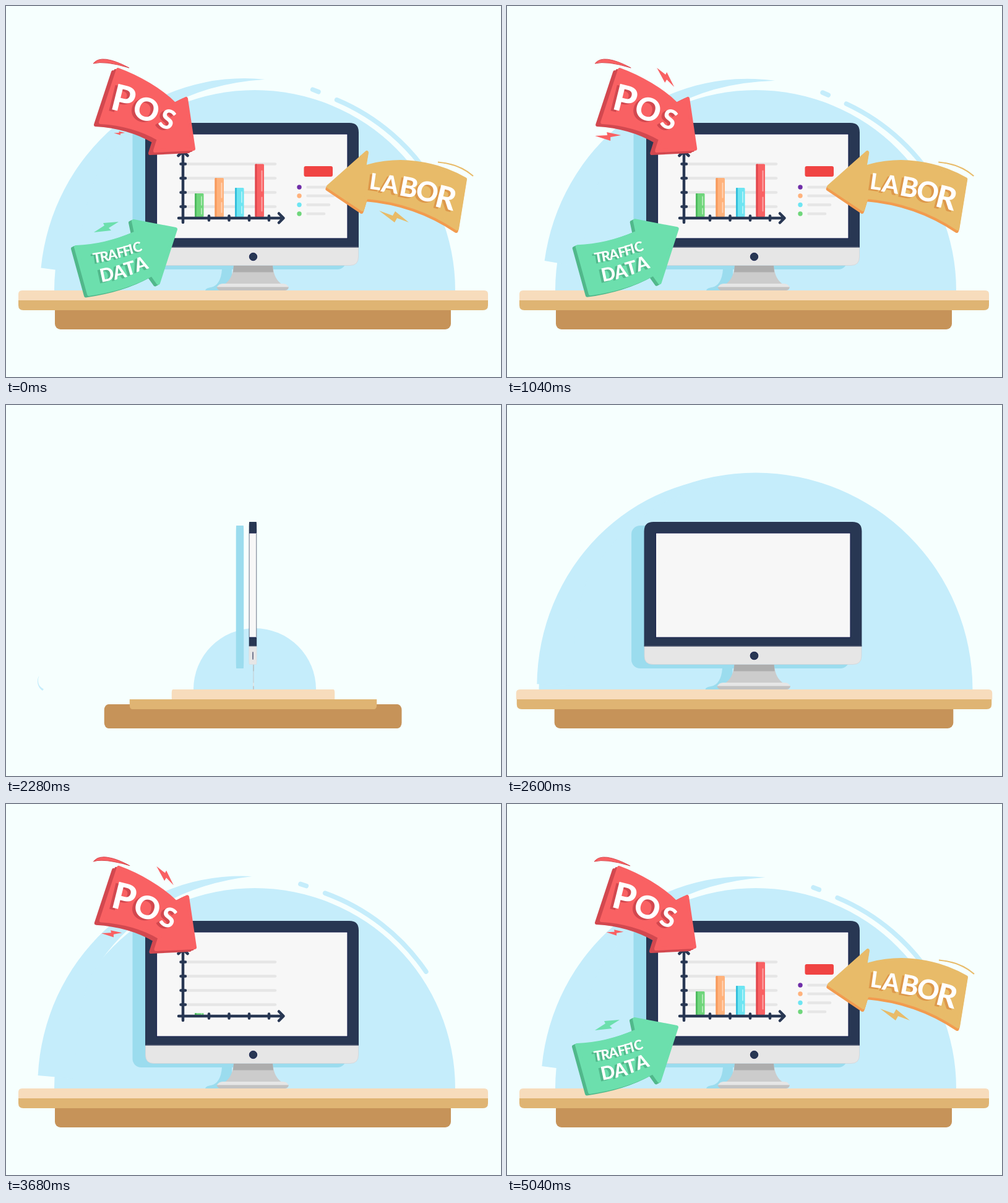
These frames come from a looping animation (800x600 px, 5080 ms). An HTML page:

```html
<!DOCTYPE html>
<html lang="en">
<head>
<meta charset="utf-8">
<title>Data dashboard</title>
<style>
  html, body { margin: 0; width: 100%; height: 100%; overflow: hidden; background: #f6fffe; }
  svg { display: block; width: 100%; height: 100%; }
  text { font-family: Lato, "Open Sans", sans-serif; font-weight: 800; text-anchor: middle; }
  .axis { fill: none; stroke: #283753; stroke-width: 4.5; stroke-linecap: round; stroke-linejoin: round; }
  .line { fill: none; stroke: #e6e6e6; stroke-width: 4.5; stroke-linecap: round; }
  .sky { fill: none; stroke: #c5edfb; stroke-width: 7.5; stroke-linecap: round; }
</style>
</head>
<body>
<svg viewBox="0 0 800 600">
  <defs>
    <filter id="smear" filterUnits="userSpaceOnUse" x="0" y="-100" width="800" height="800">
      <feGaussianBlur id="blur" stdDeviation="0 0"/>
    </filter>
  </defs>
  <g id="scene"><g id="smeared">
    <path id="dome" d="M78 460A324 324 0 0 1 726 460Z" fill="#c5edfb"/>
    <g id="swirl">
      <path id="crescent" fill="#c5edfb" d="M50 445A328.5 339.5 0 0 1 390 116.5Q215 140 134 280Q108 340 110 449Z"/>
      <path id="dashA" class="sky" pathLength="1" d="M468.5 127.5L478 130.5"/>
      <path id="dashB" class="sky" pathLength="1" d="M508.5 141.5A336 336 0 0 1 674 265.5"/>
    </g>
    <ellipse id="glint" cx="636.5" cy="267.5" rx="3.6" ry="2.4" fill="#f6fffe"/>

    <rect id="shade" x="204.5" y="195" width="345" height="231" rx="14" fill="#9bdcee"/>
    <g id="base"><rect x="79" y="484" width="640" height="39" rx="9" fill="#c69359"/></g>
    <g id="mid"><path d="M20 476H779V484Q779 492 771 492H28Q20 492 20 484Z" fill="#dfb473"/></g>
    <g id="top"><path d="M20 476V466Q20 460 26 460H773Q779 460 779 466V476Z" fill="#f7dcbc"/></g>

    <g id="stand">
      <path d="M349 426Q347 452 331 455Q323 456 322 460H365V426Z" fill="#9bdcee"/>
      <path d="M368 420H431Q433 442 446 450H353Q366 442 368 420Z" fill="#ccc"/>
      <path d="M368 420H431L432 430.500H367Z" fill="#adadad"/>
      <path d="M340.500 455Q344 449 350 449H448Q454 449 457 455Z" fill="#e6e6e6"/>
      <path d="M340.500 454.500H457Q456 460 450 460H347Q342 460 340.500 454.500Z" fill="#c2c2c2"/>
    </g>
    <g id="monitor">
      <path d="M225 390V204Q225 189 240 189H555Q570 189 570 204V390Z" fill="#283753"/>
      <path d="M225.500 390H569.500V406Q569.500 419.500 556 419.500H239Q225.500 419.500 225.500 406Z" fill="#e6e6e6" stroke="#d3d5d9" stroke-width=".8"/>
      <path d="M225 390H570" stroke="#1c2848"/>
      <rect x="243.500" y="207" width="308.500" height="169" fill="#f7f7f7" stroke="#1b2450" stroke-width="1.2"/>
      <circle cx="399.500" cy="405.500" r="6.2" fill="#283753" stroke="#1b2450"/>
    </g>
    <g id="grid"></g>
    <g id="bars"></g>
    <g id="axes" class="axis">
      <path id="axisY" d="M286 350V236M278.500 242L286 235L293.500 242M282.500 255.500H290M282.500 278.500H290M282.500 301.500H290M282.500 324.500H290"/>
      <path id="axisX" d="M279 343H447M441 335.500L448.500 343L441 350.500M328 339.500V346.500M360.500 339.500V346.500M393 339.500V346.500M425 339.500V346.500"/>
    </g>
    <g id="legend"></g>
    <g id="pos"></g>
    <g id="labor"></g>
    <g id="traffic"></g>
  </g></g>
</svg>
<script>
const LOOP = 5080, FALL = 1440, GONE = 1720, ENTER = 2040;
const $ = id => document.getElementById(id);
const clamp = x => Math.max(0, Math.min(1, x));
const ramp = (u, start, len) => clamp((u - start) / len);
const smooth = x => x * x * (3 - 2 * x);
const swing = x => (1 - Math.cos(Math.PI * clamp(x))) / 2;

// Eased growth to 1 with a small overshoot that settles.
function rise(u, start, len = 360, over = 0.017) {
  const age = u - start;
  if (age <= 0) return 0;
  return age < len
    ? (1 + over) * swing(age / len)
    : 1 + over * (1 - swing((age - len) / len));
}

function scaleAt(el, x, y, sx, sy = sx, turn = 0) {
  el.style.display = sx > 0.0001 && sy > 0.0001 ? "" : "none";
  el.setAttribute("transform",
    `translate(${x} ${y}) rotate(${turn}) scale(${sx} ${sy}) translate(${-x} ${-y})`);
}

function draw(el, p) {
  el.style.display = p > 0 ? "" : "none";
  el.setAttribute("stroke-dasharray", p < 1 ? `${p} 2` : "none");
}

// Arrow bodies and lettering
function block(d, face, side, dx, dy) {
  const copy = (k, c) => `<path d="${d}" transform="translate(${dx * k} ${dy * k})" fill="${c}"
    stroke="${c}" stroke-width="6" stroke-linejoin="round"/>`;
  return copy(1, side) + copy(0.5, side) + copy(0, face);
}

function word(letters, shade, dx, dy) {
  const layer = (c, ox, oy) => letters.map(([ch, x, y, turn, size]) =>
    `<text transform="translate(${x + ox} ${y + oy}) rotate(${turn})" y="${size * 0.36}"
      font-size="${size}" fill="${c}">${ch}</text>`).join("");
  return layer(shade, dx, dy) + layer("#fff", 0, 0);
}

const bolt = (id, points, color) => `<polygon id="${id}" points="${points}" fill="${color}"/>`;

$("pos").innerHTML =
  `<path d="M141 93Q154 76 199 100Q160 88 141 93Z" fill="#f96163" stroke="#d9494f" stroke-width="1"/>` +
  bolt("boltA", "241,100 255,111 257,107 269,131 257,119 254,124", "#f96163") +
  bolt("boltB", "141,210 161,209 160,204 183,209 166,212 166,218", "#f96163") +
  block("M181 103C214 115 250 136 273 159L291 150L303 231L241 234L247 215C218 198 186 190 153 188Z",
    "#f96163", "#d2484f", -8, 4) +
  word([["P", 190, 150, 14, 59], ["O", 227, 167, 18, 51], ["S", 261, 183, 21, 44]], "#d2484f", -5, 2);

$("labor").innerHTML =
  `<path id="swoosh" d="M755 275Q732 255 698 252.500" pathLength="1" fill="none" stroke="#e8bb69" stroke-width="2.2"/>` +
  bolt("boltC", "603,331 625,339 629,332 651,350 632,343 628,350", "#e8bb69") +
  block("M521 292L583 237L579 261C634 244 692 252 742 280L729 360C680 327 630 313 582 309L576 329Z",
    "#e8bb69", "#f29b4f", -1.5, 4) +
  word([["L", 597, 284, 8, 36], ["A", 621, 288, 9, 39], ["B", 651, 293, 11, 44],
    ["O", 681, 300, 12, 44], ["R", 711, 310, 14, 50]], "#dd984b", -4, 2);

$("traffic").innerHTML =
  bolt("boltD", "142,366 159,355 157,351 182,349 166,359 170,363", "#6cdfad") +
  block("M113 390C147 389 180 380 210 367L206 348L274 361L246 448L236 434C206 451 170 461 134 466Z",
    "#6cdfad", "#51b88b", -5, 2.5) +
  word([["T", 147, 407, -9, 22], ["R", 159, 405, -10, 22], ["A", 172, 402, -12, 22], ["F", 185, 398.500, -13, 22],
    ["F", 195, 395.500, -14, 22], ["I", 202, 393, -15, 22], ["C", 212, 390, -16, 22]], "#51b88b", -3, 2) +
  word([["D", 163, 434, -12, 30], ["A", 183, 430, -14, 30], ["T", 200, 424, -16, 30], ["A", 218, 417, -18, 30]],
    "#51b88b", -4, 2);

// Chart and legend
$("grid").innerHTML = [255.5, 278.5, 301.5, 324.5]
  .map(y => `<path class="line" d="M288 ${y}H435"/>`).join("");

const bars = [
  [305, 303, "#6fd67b", "#4fbb60"], [337.5, 278, "#ffb27c", "#f79a5c"],
  [370, 294, "#6de5f2", "#35bfdc"], [402.5, 255.5, "#f96163", "#df474d"]
];
$("bars").innerHTML = bars.map(([x, y, face, side]) => {
  const h = 341 - y;
  return `<g><rect x="${x}" y="${y}" width="14.5" height="${h}" rx="1.5" fill="${face}"/>
    <rect x="${x}" y="${y}" width="3" height="${h}" rx="1" fill="${side}"/>
    <rect x="${x + 10}" y="${y + h * 0.12}" width="2" height="${h * 0.4}" rx="1" fill="#fff" opacity=".45"/>
    <rect x="${x + 10}" y="${y + h * 0.62}" width="2" height="${h * 0.28}" rx="1" fill="#fff" opacity=".45"/></g>`;
}).join("");

const items = [[293, 531, "#6f2da8"], [307, 529, "#ffb27c"], [321.5, 522, "#6de5f2"], [336, 514, "#6fd67b"]];
$("legend").innerHTML = `<rect x="481.500" y="259" width="46.500" height="17" rx="3" fill="#f04443"/>` +
  items.map(([y, end, color]) => `<circle cx="474" cy="${y}" r="3.7" fill="${color}"/>
    <path class="line" pathLength="1" d="M487.500 ${y}H${end}"/>`).join("");

const barEls = [...$("bars").children];
const [button, ...legendEls] = $("legend").children;

// Each span is [on, off] on the running clock.
const pulse = (u, spans) => Math.max(...spans.map(([on, off]) =>
  Math.min(smooth(ramp(u, on, 200)), 1 - ramp(u, off - 167, 167))));

function placeArrow(id, x, y, size, dx, dy) {
  const el = $(id);
  scaleAt(el, x, y, size);
  el.setAttribute("transform", `translate(${dx} ${dy}) ` + el.getAttribute("transform"));
}

function render(t) {
  const hidden = t >= GONE && t < ENTER;
  $("scene").style.display = hidden ? "none" : "";
  if (hidden) return;

  // The clock runs on from the entrance through the end of the fall.
  const u = t < GONE ? t + LOOP : t;

  const k = t < GONE ? Math.max(0, t - FALL) / 240 : 0;
  $("scene").setAttribute("transform", `translate(0 ${445 * k ** 3.2})`);
  if (k > 0) {
    $("smeared").setAttribute("filter", "url(#smear)");
    $("blur").setAttribute("stdDeviation", `0 ${8.5 * k * k}`);
  } else $("smeared").removeAttribute("filter");

  // Table, dome, monitor
  scaleAt($("base"), 399.5, 500, rise(u, 2044), 1);
  scaleAt($("mid"), 399.5, 484, rise(u, 2097), 1);
  scaleAt($("top"), 399.5, 468, rise(u, 2138), 1);
  const dip = 0.007 * smooth(ramp(u, 2600, 300)) * (1 - smooth(ramp(u, 3140, 500)));
  scaleAt($("dome"), 402, 460, rise(u, 2146, 380, 0.09) - dip);
  const wide = rise(u, 2240, 340, 0.02);
  scaleAt($("monitor"), 399, 400, wide, 1);
  scaleAt($("shade"), 378, 400, wide, 1);
  scaleAt($("stand"), 400, 440, rise(u, 2256, 340, 0.02), 1);

  // Swirl
  $("swirl").setAttribute("transform", `rotate(${2.03 * (u - 3160) / 1000} 370 530)`);
  const unfurl = rise(u, 2228, 360, 0);
  scaleAt($("crescent"), 62, 452, unfurl, unfurl, -60 * (1 - unfurl));
  draw($("dashA"), smooth(ramp(u, 2620, 160)));
  draw($("dashB"), smooth(ramp(u, 2680, 380)));
  $("glint").style.display = u > 3110 && u < 3210 ? "" : "none";

  // Chart
  scaleAt($("axisY"), 286, 343, 1, rise(u, 2720, 340, 0.03));
  scaleAt($("axisX"), 286, 343, rise(u, 2800, 340, 0.015), 1);
  scaleAt($("grid"), 361.5, 290, rise(u, 3020, 300, 0.01), 1);
  barEls.forEach((el, i) => scaleAt(el, 0, 341, 1, rise(u, 3618 + 120 * i)));
  scaleAt(button, 504.75, 267.5, rise(u, 4300, 280, 0.05));
  items.forEach(([y], i) => {
    scaleAt(legendEls[2 * i], 474, y, rise(u, 4380 + 60 * i, 240, 0.08));
    draw(legendEls[2 * i + 1], swing(ramp(u, 4420 + 60 * i, 240)));
  });

  // Arrows
  const sway = (1 - Math.cos(2 * Math.PI * (u - 5060) / 1570)) / 2;
  placeArrow("pos", 78, 114, rise(u, 3136), 1.7 * sway, 0);
  placeArrow("labor", 800, 300, rise(u, 3720), -sway, 0);
  placeArrow("traffic", 42, 457, rise(u, 4092), sway, -sway);
  draw($("swoosh"), smooth(ramp(u, 4120, 180)));

  scaleAt($("boltA"), 270, 131, pulse(u, [[3500, 5040], [5500, 6725]]));
  scaleAt($("boltB"), 199, 202, pulse(u, [[3540, 5152], [5500, 6820]]));
  scaleAt($("boltC"), 633, 340, pulse(u, [[4320, 5800], [6560, 7600]]));
  scaleAt($("boltD"), 144, 365, pulse(u, [[4560, 5800], [6620, 7600]]));
}

function tick(now) {
  render(now % LOOP);
  requestAnimationFrame(tick);
}
render(0);
requestAnimationFrame(tick);
</script>
</body>
</html>
```
